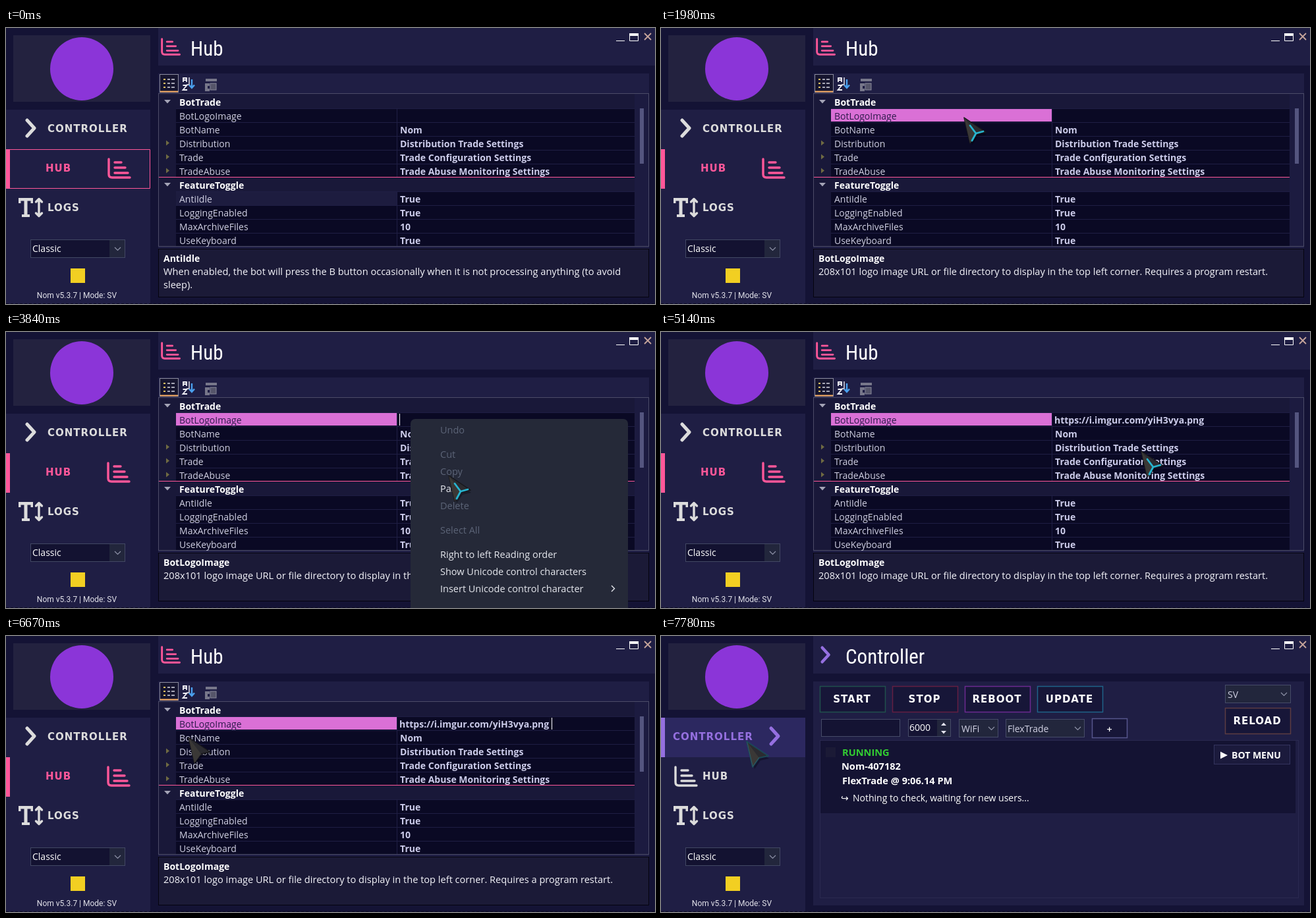
Animation of 985 by 419 pixels, one loop 7850 ms. Source, as an HTML page:

```html
<!DOCTYPE html>
<html lang="en">
<head>
<meta charset="utf-8">
<title>Bot settings</title>
<style>
html, body { margin: 0; width: 100%; height: 100%; overflow: hidden; background: #141335; }
svg { display: block; width: 985px; height: 419px; font: 14px 'Open Sans', 'Noto Sans', sans-serif; fill: #d0d0e2; }
.b { font-weight: 700; }
.w { fill: #fff; }
.val { font-weight: 700; fill: #ccccea; }
.desc { font-size: 14.6px; fill: #f4f4fa; }
.nav { font: 700 15px 'DejaVu Sans', Inter, sans-serif; letter-spacing: 1px; }
.mid { text-anchor: middle; }
.head { font: 31px 'Roboto Condensed', Roboto, sans-serif; font-stretch: 75%; fill: #fff; }
.foot { font: 12px Roboto, sans-serif; fill: #e2e2ea; }
.menu { font-size: 14.5px; fill: #e6e8ee; }
.off { fill: #5c6477; }
.line { fill: none; stroke: currentColor; stroke-linecap: round; stroke-linejoin: round; }
.pink { color: #ff5799; fill: #ff5799; }
.violet { color: #9570e0; fill: #9570e0; }
.grey { color: #dcdcdc; fill: #dcdcdc; }

[class*=k-] { animation: 7.85s step-end infinite; }
.k-hub { animation-name: hub; }
.k-ctl { animation-name: ctl; }
.k-first { animation-name: first; }
.k-later { animation-name: later; }
.k-pick { animation-name: pick; }
.k-idle { animation-name: idle; }
.k-press { animation-name: press; }
.k-blur { animation-name: blur; }
.k-menu { animation-name: menu; }
.k-paste { animation-name: paste; }
.k-url { animation-name: url; }
.k-caret { animation-name: caret; }
.k-blink { animation-name: blink; }
.k-beam { animation-name: beam; }
.k-arrow { animation-name: arrow; }
.k-nudge { animation-name: nudge; }
.k-path { animation-name: path; }
.k-core { animation-name: core; animation-timing-function: linear; }
.k-rim { animation-name: rim; animation-timing-function: linear; }

@keyframes hub { 0% { opacity: 1 } 97.325%, to { opacity: 0 } }
@keyframes ctl { 0% { opacity: 0 } 97.325%, to { opacity: 1 } }
@keyframes first { 0% { opacity: 1 } 12.994%, to { opacity: 0 } }
@keyframes later { 0% { opacity: 0 } 12.994%, to { opacity: 1 } }
@keyframes pick { 0% { opacity: 0 } 12.994% { opacity: 1 } 95.541%, to { opacity: 0 } }
@keyframes idle { 0% { opacity: 1 } 95.541%, to { opacity: 0 } }
@keyframes press { 0% { opacity: 0 } 95.541% { opacity: 1 } 97.325%, to { opacity: 0 } }
@keyframes blur { 0% { opacity: 0 } 95.541%, to { opacity: 1 } }
@keyframes menu { 0% { opacity: 0 } 39.363% { opacity: 1 } 54.14%, to { opacity: 0 } }
@keyframes paste { 0% { opacity: 0 } 49.809%, to { opacity: 1 } }
@keyframes url { 0% { opacity: 0 } 54.14%, to { opacity: 1 } }
@keyframes caret { 0% { opacity: 0 } 32.357% { opacity: 1 } 54.14%, to { opacity: 0 } }
@keyframes blink {
  0%, 62.038%, 75.541%, 89.045%, to { opacity: 0 }
  55.287%, 68.79%, 82.293% { opacity: 1 }
}
@keyframes beam { 0% { opacity: 0 } 32.357% { opacity: 1 } 34.14% { opacity: .75 } 37.58% { opacity: 1 } 39.363%, to { opacity: 0 } }
@keyframes arrow { 0% { opacity: 0 } 2.548% { opacity: 1 } 32.357% { opacity: 0 } 39.363%, to { opacity: 1 } }
@keyframes nudge { 0% { transform: translate(1px, 0) } 12.994%, to { transform: none } }
@keyframes path {
  0% { transform: translate(560px, 365px) }
  2.548% { transform: translate(560px, 365px); animation-timing-function: steps(2) }
  4.331% { transform: translate(410px, 210px); animation-timing-function: steps(2) }
  6.115% { transform: translate(334px, 139px) }
  22.548% { transform: translate(334px, 139px); animation-timing-function: steps(3) }
  25.223% { transform: translate(460px, 136px); animation-timing-function: steps(4) }
  28.79% { transform: translate(565px, 133px); animation-timing-function: steps(4) }
  32.357% { transform: translate(614px, 132px) }
  41.911% { transform: translate(614px, 132px); animation-timing-function: steps(4) }
  45.478% { transform: translate(670px, 214px) }
  48.917% { transform: translate(672px, 218px); animation-timing-function: steps(3) }
  51.592% { transform: translate(672px, 227px) }
  59.236% { transform: translate(672px, 227px); animation-timing-function: steps(7) }
  65.478% { transform: translate(729px, 181px); animation-timing-function: steps(4) }
  69.045% { transform: translate(736px, 176px) }
  70.701% { transform: translate(736px, 176px); animation-timing-function: steps(6) }
  76.051% { transform: translate(520px, 184px); animation-timing-function: steps(6) }
  81.401% { transform: translate(346px, 177px); animation-timing-function: steps(4) }
  84.968% { transform: translate(277px, 154px); animation-timing-function: steps(4) }
  88.535% { transform: translate(180px, 157px); animation-timing-function: steps(4) }
  92.102%, to { transform: translate(130px, 160px) }
}
@keyframes core {
  0%, 18.217%, 39.363%, 81.401%, to { opacity: 0 }
  19.108%, 32%, 45.478%, 69.045% { opacity: 1 }
}
@keyframes rim {
  0%, 9.554%, 14.777%, 84.968% { opacity: 0 }
  2.548%, 6.115%, 12.994% { opacity: .7 }
  92.994% { opacity: .4 }
  96.433% { opacity: .9 }
  99.108%, to { opacity: .35 }
}
</style>
</head>
<body>
<svg viewBox="0 0 985 419">
  <defs>
    <g id="chart" class="line" stroke-width="3.4">
      <path d="M2 2V25Q2 30 7 30H34M11 7H21M11 15H27M11 23H31"/>
    </g>
    <path id="chev" class="line" stroke-width="5" d="M3 3L14 15 3 27"/>
    <path id="drop" fill="none" stroke="#8f93a8" stroke-width="1.2" d="M0 0l4.5 4.5L9 0"/>
  </defs>

  <!-- Panels -->
  <rect width="985" height="419" fill="#141335"/>
  <path d="M0 124H219V419H0zM231 0H985V57H231zM231 69H976V409H231z" fill="#1f1e44"/>
  <path d="M0 418.5H985" stroke="#0b0a20" stroke-dasharray="4 3"/>
  <rect x="11" y="11" width="208" height="101" fill="#23223f"/>
  <circle cx="115" cy="62" r="48" fill="#8b35d8"/>

  <!-- Window buttons -->
  <g fill="none" stroke="#fff">
    <path d="M926 19.5H939"/>
    <path d="M946.5 9V19.5H959.5V9"/>
    <path d="M946 10H960" stroke-width="4"/>
    <path d="M969 8L979 18M979 8L969 18" stroke="#c7a59c" stroke-width="1.8"/>
  </g>

  <!-- Sidebar -->
  <g class="grey k-idle">
    <use href="#chev" x="29" y="137"/>
    <text class="nav" x="63" y="158">CONTROLLER</text>
  </g>
  <g class="k-press">
    <rect y="124" width="219" height="60" fill="#6b66ae"/>
    <g class="grey">
      <use href="#chev" x="28" y="137"/>
      <text class="nav" x="62" y="158">CONTROLLER</text>
    </g>
  </g>
  <g class="k-ctl">
    <rect y="124" width="219" height="60" fill="#2c2860"/>
    <g class="violet">
      <rect y="124" width="6" height="60"/>
      <text class="nav" x="18" y="158">CONTROLLER</text>
      <use href="#chev" x="164" y="137"/>
    </g>
    <g class="grey">
      <use href="#chart" x="20" y="197"/>
      <text class="nav" x="63" y="218">HUB</text>
    </g>
  </g>
  <g class="pink k-hub">
    <rect y="184" width="6" height="60"/>
    <rect class="line k-first" x=".5" y="184.5" width="218" height="59"/>
    <text class="nav" x="60" y="218">HUB</text>
    <g class="k-nudge"><use href="#chart" x="153" y="197"/></g>
  </g>
  <g class="grey">
    <path d="M19 258H41V266H37.500V262.500H32.500V283H36V287H24V283H27.500V262.500H22.500V266H19z"/>
    <path class="line" stroke-width="3.4" d="M50 260V285M45.500 264L50 259.500 54.500 264M45.500 281L50 285.500 54.500 281"/>
    <text class="nav" x="63" y="278">LOGS</text>
  </g>
  <rect x="37.500" y="321.500" width="143" height="27" fill="#131231" stroke="#424863"/>
  <rect x="157" y="322" width="23" height="26" fill="#22263c"/>
  <use href="#drop" x="165" y="333"/>
  <text class="w" x="40" y="340">Classic</text>
  <rect x="98" y="365" width="22" height="22" fill="#f2cf22"/>
  <text class="foot mid" x="107.500" y="410">Nom v5.3.7 | Mode: SV</text>

  <!-- Hub page -->
  <g class="k-hub">
    <g class="pink" transform="translate(235 15) scale(.84)"><use href="#chart"/></g>
    <text class="head" x="280" y="42">Hub</text>

    <g fill="none">
      <rect x="233.500" y="70.500" width="28" height="27" fill="#16152f" stroke="#8a8a9c"/>
      <path d="M234 96.500H261" stroke="#f0a45a" stroke-width="2"/>
      <path d="M239 78H242M239 84H242M239 90H242" stroke="#e8c060" stroke-width="2"/>
      <path d="M245 78H249M251 78H256M245 84H249M251 84H256M245 90H249M251 90H256" stroke="#d8d8e4" stroke-width="1.5"/>
      <path d="M269 82V76H274V82M269 79H274M268.500 87H274.500L268.500 94H275" stroke="#f2f2f8" stroke-width="1.8"/>
      <path d="M278 75V86H274" stroke="#e0e0ea" stroke-width="1.5"/>
      <path d="M282 78V90M278 86.500L282 91 286 86.500" stroke="#4aa0ee" stroke-width="2.4"/>
      <path d="M303 79H320M309 86H304V94H309" stroke="#77778a" stroke-width="4"/>
      <rect x="310" y="84" width="9" height="10" fill="#55556a" stroke="#88889a"/>
    </g>

    <rect x="231.500" y="99.500" width="744" height="232" fill="#191839" stroke="#4c4c68"/>
    <path d="M258 123H954V227H258zM258 249H954V331H258z" fill="#0a0924"/>
    <path d="M258 122.500H954M258 143.500H954M258 164.500H954M258 185.500H954M258 206.500H954M258 248.500H954M258 269.500H954M258 290.500H954M258 311.500H954M593.500 123V227M593.500 249V331" stroke="#1f1e44"/>
    <path d="M232 226.500H954" stroke="#ff5799"/>
    <rect x="954" y="100" width="21" height="231" fill="#1c1b40"/>
    <rect x="962" y="122" width="6" height="84" fill="#54557f"/>
    <path d="M240 109H250L245 114.500zM240 235H250L245 240.500z" fill="#a4a4b6"/>
    <path d="M243 170.500L248 174.500 243 178.500zM243 191.500L248 195.500 243 199.500zM243 212.500L248 216.500 243 220.500z" fill="#6f6a42"/>

    <rect class="k-first" x="258" y="249" width="335" height="20" fill="#1d1c3f"/>
    <rect class="k-blur" x="258" y="123" width="335" height="20" fill="#1d1c3f"/>

    <g class="b w">
      <text x="263" y="118">BotTrade</text>
      <text x="263" y="244">FeatureToggle</text>
    </g>
    <text x="263" y="139">BotLogoImage</text>
    <text x="263" y="160">BotName</text>
    <text x="263" y="181">Distribution</text>
    <text x="263" y="202">Trade</text>
    <text x="263" y="223">TradeAbuse</text>
    <text x="263" y="265">AntiIdle</text>
    <text x="263" y="286">LoggingEnabled</text>
    <text x="263" y="307">MaxArchiveFiles</text>
    <text x="263" y="328">UseKeyboard</text>
    <g class="val">
      <text class="k-url" x="597" y="139">https://i.imgur.com/yiH3vya.png</text>
      <text x="598" y="160">Nom</text>
      <text x="598" y="181">Distribution Trade Settings</text>
      <text x="598" y="202">Trade Configuration Settings</text>
      <text x="598" y="223">Trade Abuse Monitoring Settings</text>
      <text x="598" y="265">True</text>
      <text x="598" y="286">True</text>
      <text x="598" y="307">10</text>
      <text x="598" y="328">True</text>
    </g>
    <g class="k-pick">
      <rect x="258" y="123" width="335" height="19" fill="#da70d6"/>
      <text x="263" y="139" fill="#2f1a4c">BotLogoImage</text>
    </g>
    <path class="k-caret" d="M597.500 124V142" stroke="#fff"/>
    <path class="k-blink" d="M828.500 124V142" stroke="#fff"/>

    <rect x="231.500" y="335.500" width="744" height="73" fill="#1b1a37" stroke="#05040f"/>
    <g class="desc k-first">
      <text class="b w" x="239" y="355" font-size="14">AntiIdle</text>
      <text x="239" y="375">When enabled, the bot will press the B button occasionally when it is not processing anything (to avoid</text>
      <text x="239" y="395">sleep).</text>
    </g>
    <g class="desc k-later">
      <text class="b w" x="239" y="355" font-size="14">BotLogoImage</text>
      <text x="239" y="375">208x101 logo image URL or file directory to display in the top left corner. Requires a program restart.</text>
    </g>

    <g class="menu k-menu">
      <rect x="614" y="132" width="330" height="300" rx="7" fill="#252938"/>
      <rect class="k-paste" x="619" y="226" width="320" height="25" rx="4" fill="#303546"/>
      <g class="off">
        <text x="659" y="154">Undo</text>
        <text x="659" y="191">Cut</text>
        <text x="659" y="217">Copy</text>
        <text x="659" y="269">Delete</text>
        <text x="659" y="306">Select All</text>
      </g>
      <text x="659" y="243">Paste</text>
      <text x="659" y="343">Right to left Reading order</text>
      <text x="659" y="369">Show Unicode control characters</text>
      <text x="659" y="395">Insert Unicode control character</text>
      <path d="M919 385L923.500 389.500 919 394" fill="none" stroke="#e6e8ee" stroke-width="1.4"/>
    </g>
  </g>

  <!-- Controller page -->
  <g class="k-ctl">
    <g class="violet" transform="translate(242 15) scale(.9)"><use href="#chev"/></g>
    <text class="head" x="280" y="42">Controller</text>

    <g fill="#171638" stroke-width="1.5">
      <rect x="241.500" y="76.500" width="99" height="39" stroke="#20504c"/>
      <rect x="351.500" y="76.500" width="99" height="39" stroke="#641f42"/>
      <rect x="461.500" y="76.500" width="99" height="39" stroke="#6c2a90"/>
      <rect x="571.500" y="76.500" width="99" height="39" stroke="#1f6388"/>
      <rect x="856.500" y="109.500" width="99" height="39" stroke="#5c3c42"/>
      <rect x="654.500" y="125.500" width="53" height="29" stroke="#56568c"/>
    </g>
    <g class="nav w mid">
      <text x="290" y="101">START</text>
      <text x="400" y="101">STOP</text>
      <text x="510" y="101">REBOOT</text>
      <text x="620" y="101">UPDATE</text>
      <text x="905" y="134">RELOAD</text>
      <text x="681" y="145" font-size="11">+</text>
    </g>
    <g fill="#141333" stroke="#464b68">
      <rect x="243.500" y="126.500" width="119" height="26"/>
      <rect x="375.500" y="126.500" width="64" height="26"/>
      <g fill="#22263c">
        <rect x="452.500" y="126.500" width="59" height="27"/>
        <rect x="523.500" y="126.500" width="119" height="27"/>
        <rect x="856.500" y="74.500" width="99" height="27"/>
      </g>
    </g>
    <rect x="419" y="127" width="20" height="25" fill="#22263c"/>
    <path d="M425 136L429 131.500 433 136zM425 144L429 148.500 433 144z" fill="#e4e4ee"/>
    <text class="w" x="377" y="144">6000</text>
    <text x="456" y="146">WiFi</text>
    <text x="526" y="146">FlexTrade</text>
    <text x="860" y="94">SV</text>
    <use href="#drop" x="497" y="138"/>
    <use href="#drop" x="628" y="138"/>
    <use href="#drop" x="941" y="86"/>

    <rect x="241.500" y="158.500" width="726" height="239" fill="none" stroke="#2a2950"/>
    <rect x="242" y="159" width="721" height="110" fill="#141333"/>
    <rect x="250" y="169" width="15" height="15" fill="#1b1a36"/>
    <g class="b w" font-size="14.6">
      <text x="275" y="182" fill="#32cd32">RUNNING</text>
      <text x="274" y="203">Nom-407182</text>
      <text x="275" y="225">FlexTrade @ 9:06.14 PM</text>
    </g>
    <text class="w" x="273" y="251" font-family="DejaVu Sans, sans-serif">↪</text>
    <text class="w" x="291" y="251">Nothing to check, waiting for new users...</text>
    <rect x="839.500" y="165.500" width="115" height="29" fill="#1b1a3c" stroke="#34345e"/>
    <path class="w" d="M849 175.500L860 181 849 186.500z"/>
    <text class="b w" x="866" y="186">BOT MENU</text>
  </g>

  <!-- Pointer -->
  <g class="k-path">
    <g class="k-arrow">
      <path d="M2 4L34 26 21 29 12 42z" fill="#000" opacity=".3"/>
      <path d="M0 0L33 22 19 25 9 39z" fill="#2b2b30" stroke="#17171b" stroke-width="1.5" stroke-linejoin="round"/>
      <path d="M0 0L19 25 9 39z" fill="#3a3836"/>
      <path class="k-core" d="M9 12L18 24 29 21M18 24L12 35" fill="none" stroke="#27b4cf" stroke-width="2.8" stroke-linecap="round" stroke-linejoin="round"/>
      <path class="k-rim" d="M0 0L33 22 19 25 9 39z" fill="none" stroke="#1d9dbb" stroke-width="1.8" stroke-linejoin="round"/>
    </g>
    <g class="k-beam" fill="none">
      <path d="M-5 -13H5M0 -13V13M-5 13H5" stroke="#1d9dbb" stroke-width="4"/>
      <path d="M-5 -13H5M0 -13V13M-5 13H5" stroke="#2b2b30" stroke-width="2"/>
    </g>
  </g>
</svg>
</body>
</html>
```
